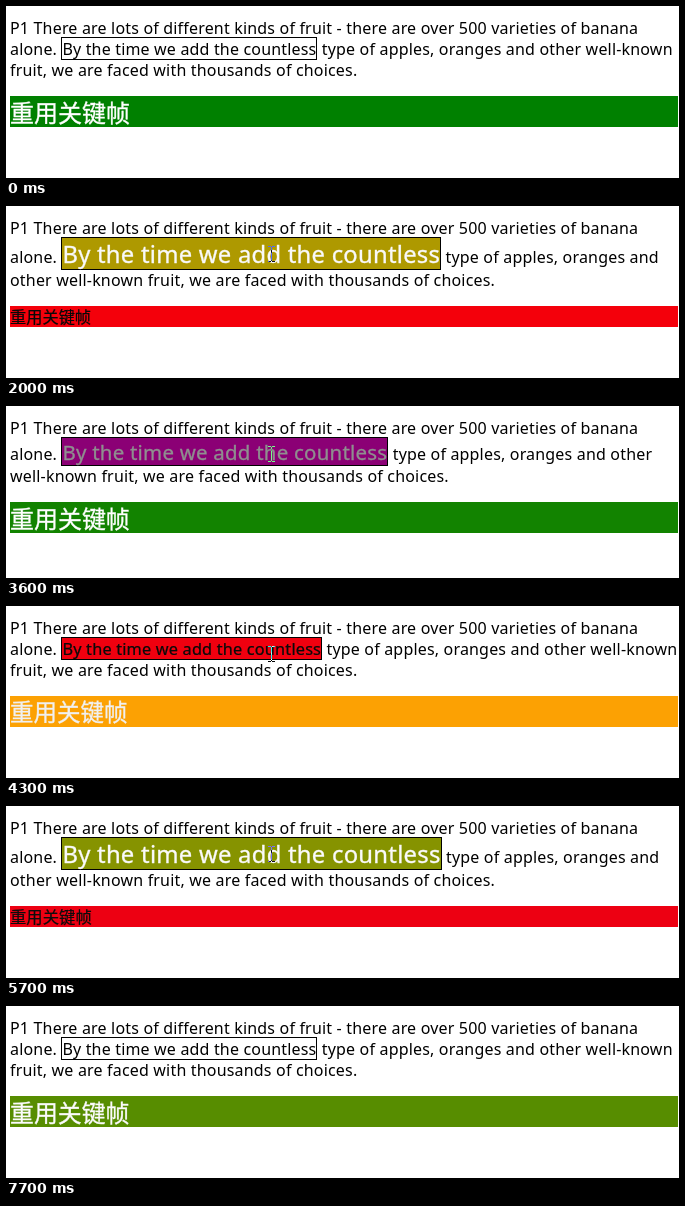
An HTML page for the animation above (7800 ms loop, 673 by 172 pixels).

```html
<!DOCTYPE html>
<html lang="zh-CN">
<head>
<meta charset="utf-8">
<title>Reused keyframes</title>
<style>
html, body { margin: 0; width: 100%; height: 100%; overflow: hidden; background: #fff; }
#stage { position: relative; width: 673px; height: 172px; overflow: hidden; background: #fff; --line: 21px; }
p {
  position: absolute; left: 4px; top: 12px; width: 670px; margin: 0;
  font: 16px/21px "Noto Sans", "Open Sans", sans-serif; letter-spacing: .0113em; color: #000;
}
#phrase {
  display: inline-block; margin-top: -2px; padding-top: 2px; border: 1px solid #000;
  line-height: calc(var(--line) - 2px); letter-spacing: .0108em; white-space: nowrap;
}
#bar {
  position: absolute; left: 4px; width: 668px;
  font-family: "Noto Sans CJK SC", "Noto Sans CJK", sans-serif; line-height: var(--line);
}
#phrase.hover, #bar { -webkit-text-stroke: .015em currentColor; }
#cursor { position: absolute; left: 262px; mix-blend-mode: difference; }
</style>
</head>
<body>
<div id="stage">
  <p id="text" lang="en">P1 There are lots of different kinds of fruit - there are over 500 varieties of banana alone. <span id="phrase">By the time we add the countless</span> type of apples, oranges and other well-known fruit, we are faced with thousands of choices.</p>
  <div id="bar">重用关键帧</div>
  <svg id="cursor" width="7" height="16" shape-rendering="crispEdges">
    <path d="M0 .5H3M4 .5H7M3.5 1V15M0 15.5H3M4 15.5H7" stroke="#fff" fill="none"/>
  </svg>
</div>
<script>
const LOOP = 7800, STEP = 100, HALF_CYCLE = 1834;
const BAR_PEAK = 81, HOVER_START = 528, HOVER_END = 7200;
const ASCENT = 1.059, DESCENT = .262;
const STOPS = [
  [0, [255, 0, 0]],
  [.5, [128, 0, 128]],
  [.75, [255, 165, 0]],
  [1, [0, 128, 0]],
];
const [text, phrase, bar, cursor] =
  ['text', 'phrase', 'bar', 'cursor'].map(id => document.getElementById(id));

const mix = (a, b, f) => a + (b - a) * f;
const clamp = v => Math.min(1, Math.max(0, v));
const pingPong = u => 1 - Math.abs(1 - u % 2);
const lineHeight = size => Math.round(size * ASCENT) + Math.round(size * DESCENT);

// CSS "ease": cubic-bezier(.25, .1, .25, 1)
function ease(x) {
  let lo = 0, hi = 1;
  for (let i = 0; i < 24; i++) {
    const s = (lo + hi) / 2;
    if (.75 * s * (1 - s) + s ** 3 < x) lo = s; else hi = s;
  }
  const s = (lo + hi) / 2, r = 1 - s;
  return .3 * s * r * r + 3 * s * s * r + s ** 3;
}

function background(t) {
  const i = Math.max(1, STOPS.findIndex(([at]) => t <= at));
  const [from, a] = STOPS[i - 1], [to, b] = STOPS[i];
  const f = ease((t - from) / (to - from));
  return `rgb(${a.map((v, k) => Math.round(mix(v, b[k], f)))})`;
}

// Colour stops ease one by one; size and text colour ease over the whole run.
function applyKeyframes(el, t) {
  const f = ease(t), grey = Math.round(255 * f), size = mix(16, 24, f);
  el.style.fontSize = size + 'px';
  el.style.setProperty('--line', lineHeight(size) + 'px');
  el.style.color = `rgb(${grey},${grey},${grey})`;
  el.style.background = background(t);
}

function moveCursor(ms) {
  cursor.style.display = ms >= 400 && ms < 7300 ? 'block' : 'none';
  const top = ms < HOVER_END ? mix(6, 40, clamp((ms - 400) / 200)) : 23;
  cursor.style.top = Math.round(top) + 'px';
}

function render(elapsed) {
  const ms = Math.floor(elapsed % LOOP / STEP) * STEP;
  const hovered = ms >= HOVER_START && ms < HOVER_END;
  phrase.classList.toggle('hover', hovered);
  if (hovered) {
    applyKeyframes(phrase, pingPong((ms - HOVER_START) / HALF_CYCLE));
  } else {
    phrase.style.cssText = '';
  }
  applyKeyframes(bar, pingPong(1 + Math.max(0, ms - BAR_PEAK) / HALF_CYCLE));
  bar.style.top = 27 + text.offsetHeight + 'px';
  moveCursor(ms);
}

const start = performance.now();
(function frame() {
  render(performance.now() - start);
  requestAnimationFrame(frame);
})();
</script>
</body>
</html>
```
